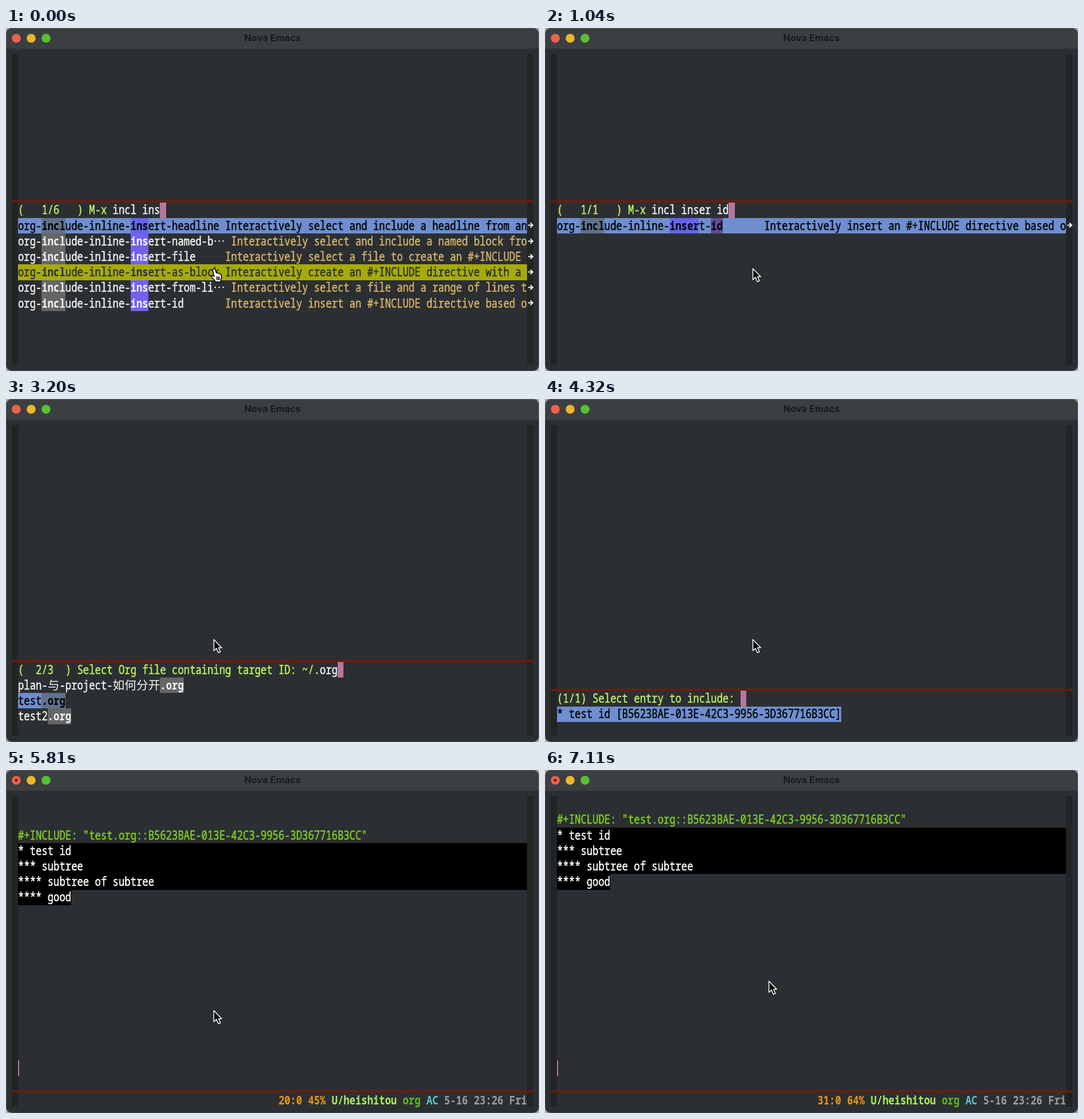
Recreate the animation shown at these times as an HTML page with a canvas. Size 932 by 601 pixels, loop 7230 ms.

```html
<!DOCTYPE html>
<html lang="en">
<head>
<meta charset="utf-8">
<title>Nova Emacs</title>
<style>
  html, body { margin: 0; width: 100%; height: 100%; overflow: hidden; background: #a9a8ab; }
  canvas { display: block; }
</style>
</head>
<body>
<canvas id="stage" width="932" height="601"></canvas>
<script>
const ctx = document.getElementById('stage').getContext('2d');
const LOOP = 7230;
const LEFT = 21, RIGHT = 911, CELL = 10.35, ROW = 27.2, TOP = 46.4;
const BASELINE = 20.7, TALL = 1.25;
const MONO = '"Noto Sans Mono", "DejaVu Sans Mono", monospace';
const CJK = '"Noto Sans CJK SC", "Noto Sans CJK", sans-serif';
const WIDE = /[…\u4e00-\u9fff]/;
const BG = '#2b2f32', WHITE = '#f4f4f2', BLUE = '#6e8ed0', CURSOR = '#b8769e';
const ID = 'B5623BAE-013E-42C3-9956-3D367716B3CC';

ctx.font = `100px ${MONO}`;
const SIZE = CELL * 100 / ctx.measureText('0').width;

const style = (fg, bg, bold) => ({ fg, bg, bold });
const normal = {
  text: style(WHITE),
  first: style(WHITE, '#656665', true),
  second: style(WHITE, '#7261f0', true),
  third: style(WHITE, '#6f4a92', true),
  note: style('#d9b36a')
};
const chosen = {
  text: style('#000', BLUE),
  first: style('#000', '#61718c', true),
  second: style('#000', '#6464ee', true),
  third: style('#000', '#604c92', true),
  note: style('#000')
};
const hovered = {
  text: style(BG),
  first: style(BG, null, true),
  second: style(BG, null, true),
  third: style(BG, null, true),
  note: style(BG)
};
const prompt = style('#bdf266');

const COMMANDS = [
  ['headline', 'Interactively select and include a headline from an'],
  ['named-b…', 'Interactively select and include a named block fro'],
  ['file', 'Interactively select a file to create an #+INCLUDE'],
  ['as-block', 'Interactively create an #+INCLUDE directive with a'],
  ['from-li…', 'Interactively select a file and a range of lines t'],
  ['id', 'Interactively insert an #+INCLUDE directive based o']
];

function box(x, y, w, h, color) {
  ctx.fillStyle = color;
  ctx.fillRect(Math.round(x), Math.round(y),
    Math.round(x + w) - Math.round(x), Math.round(y + h) - Math.round(y));
}

const widthOf = text => [...text].reduce((n, ch) => n + (WIDE.test(ch) ? 2 : 1), 0);

// Writes styled parts on the character grid and returns the next free column.
function line(y, parts, col = 0) {
  for (const [text, { fg, bg, bold }] of parts) {
    if (bg) box(LEFT + col * CELL, y, widthOf(text) * CELL, ROW, bg);
    ctx.fillStyle = ctx.strokeStyle = fg;
    for (const ch of text) {
      const wide = WIDE.test(ch);
      ctx.save();
      ctx.translate(LEFT + col * CELL, Math.round(y + BASELINE));
      if (wide) {
        ctx.font = `${2 * CELL}px ${CJK}`;
      } else {
        ctx.font = `${bold ? 700 : 500} ${SIZE}px ${MONO}`;
        ctx.scale(1, TALL);
      }
      ctx.fillText(ch, 0, 0);
      if (!wide && !bold) {
        ctx.lineWidth = 0.45;
        ctx.strokeText(ch, 0, 0);
      }
      ctx.restore();
      col += wide ? 2 : 1;
    }
  }
  return col;
}

// Separator resting on the row that starts at y.
function divider(y) {
  ctx.fillStyle = '#6e1c0e';
  ctx.fillRect(10, y - 3.6, 912, 3.6);
}

function cutArrow(y) {
  const mid = Math.round(y + ROW / 2) - 0.5;
  ctx.strokeStyle = WHITE;
  ctx.lineWidth = 2;
  ctx.stroke(new Path2D(`M913 ${mid}h7M917 ${mid - 4}l4 4l-4 4`));
}

function blockCursor(col, y, on) {
  if (on) box(LEFT + col * CELL, y, CELL, ROW, CURSOR);
}

function commandRow(y, [name, note], length, look, last) {
  const full = 'org-include-inline-insert-' + name;
  const end = 19 + length;
  const tail = last
    ? [[full.slice(end, -2), look.text], [full.slice(-2), look.third]]
    : [[full.slice(end), look.text]];
  if (look === chosen) box(LEFT, y, RIGHT - LEFT, ROW, BLUE);
  if (look === hovered) box(LEFT, y, RIGHT - LEFT, ROW, '#a6aa0b');
  const col = line(y, [
    [full.slice(0, 4), look.text], [full.slice(4, 8), look.first],
    [full.slice(8, 19), look.text], [full.slice(19, end), look.second], ...tail
  ]);
  line(y, [[note, look.note]], Math.max(35, col + 1));
  cutArrow(y);
}

function commands(typed, cursorOn) {
  const y = 305.6;
  const [word, extra] = typed.split(' ');
  const single = extra === 'id';
  const list = single ? COMMANDS.slice(-1) : COMMANDS;
  divider(y);
  const col = line(y, [[`(   1/${list.length}   ) M-x `, prompt], ['incl ' + typed, normal.text]]);
  blockCursor(col, y, cursorOn);
  list.forEach((command, i) => {
    const look = i === 0 ? chosen : i === 3 ? hovered : normal;
    commandRow(y + (i + 1) * ROW, command, word.length, look, single);
  });
}

function files(selected, message, cursorOn) {
  const y = 460.8;
  divider(y);
  const col = line(y, [
    [`(  ${selected + 1}/3  ) Select Org file containing target ID: ~/`, prompt],
    ['.org', normal.text]
  ]);
  blockCursor(col, y, cursorOn);
  ['plan-与-project-如何分开', 'test', 'test2'].forEach((name, i) => {
    const look = i === selected ? chosen : normal;
    const next = line(y + (i + 1) * ROW, [[name, look.text], ['.org', look.first]]);
    if (message && i === 2) {
      line(y + 3 * ROW, [['[Refresh complete. Processed 4 includes.]', normal.text]], next + 1);
    }
  });
}

function entries(message, cursorOn) {
  const y = 511.4;
  divider(y);
  blockCursor(line(y, [['(1/1) Select entry to include: ', prompt]]), y, cursorOn);
  const col = line(y + ROW, [[`* test id [${ID}]`, chosen.text]]);
  if (message) {
    line(y + ROW, [['[Refresh complete. Processed 4 includ', normal.text]], col + 1);
    cutArrow(y + ROW);
  }
}

function buffer(firstRow, position, cursorOn) {
  if (firstRow !== null) {
    const y = TOP + firstRow * ROW;
    line(y, [[`#+INCLUDE: "test.org::${ID}"`, style('#80cf1f')]]);
    box(LEFT, y + ROW, RIGHT - LEFT, 3 * ROW, '#000');
    ['* test id', '*** subtree', '**** subtree of subtree', '**** good'].forEach((text, i) =>
      line(y + (i + 1) * ROW, [[text, style('#fff', '#000')]]));
  }
  if (cursorOn) box(LEFT, 509, 2, 27, CURSOR);
  const modeLine = 564.8;
  divider(modeLine);
  line(modeLine, [
    [position + ' ', style('#e8950f', null, true)],
    ['U/heishitou ', style('#a9ef52', null, true)],
    ['org ', style('#5cbb14', null, true)],
    ['AC ', style('#62c3d0', null, true)],
    ['5-16 23:26 Fri', style('#9b9c9c', null, true)]
  ], 44);
}

const SCENES = [
  [0, on => commands('ins', on)],
  [120, on => commands('inse', on)],
  [240, on => commands('inser', on)],
  [670, on => commands('inser ', on)],
  [980, on => commands('inser i', on)],
  [1040, on => commands('inser id', on)],
  [1720, on => files(0, false, on)],
  [1840, on => files(0, true, on)],
  [3200, on => files(1, false, on)],
  [4320, on => entries(false, on)],
  [4440, on => entries(true, on)],
  [5750, on => buffer(null, '20:0 45%', on)],
  [5810, on => buffer(2, '20:0 45%', on)],
  [5870, on => buffer(1, '20:0 45%', on)],
  [6490, on => buffer(1, '31:0 64%', on)]
];
const CURSOR_OFF = [[1540, 1720], [2400, 2830], [3700, 4200], [4940, 5440], [6370, 6800]];

function disc(x, y, r, color) {
  ctx.fillStyle = color;
  ctx.beginPath();
  ctx.arc(x, y, r, 0, 7);
  ctx.fill();
}

function chrome(edited) {
  box(0, 0, 932, 601, BG);
  box(0, 0, 932, 36, '#3c3f41');
  box(0, 36, 932, 1, '#303336');
  for (const x of [10, RIGHT]) box(x, 46, 11, 544, '#222426');
  ['#ea624d', '#eeb62a', '#56c135'].forEach((color, i) => disc(18 + 26 * i, 18, 7.8, color));
  if (edited) disc(18, 18, 2.4, '#5e120b');
  ctx.fillStyle = '#191a1b';
  ctx.font = '700 16.5px Inter, sans-serif';
  ctx.textAlign = 'center';
  ctx.fillText('Nova Emacs', 466, 23);
  ctx.textAlign = 'left';
}

const ARROW = new Path2D('M0 0V19.5L4.5 15.4L7.8 23L11.4 21.5L8.2 14.2H13.6Z');
const HAND = new Path2D('M4 2Q6.5 0 8 3L10 9Q12 7.5 13 9.5Q15 8.5 16 10.5' +
  'Q18 10 18.5 13Q19.5 18 17.5 21V24.5H8.5Q7 21 3 17.5Q0 14.5 1.5 13.5Q3.5 13 6 15L3.5 5Q3 3 4 2Z');

function pointer(shape, x, y, fill, edge) {
  ctx.save();
  ctx.translate(x, y);
  ctx.lineJoin = 'round';
  ctx.lineWidth = 1.5;
  ctx.fillStyle = fill;
  ctx.strokeStyle = edge;
  ctx.fill(shape);
  ctx.stroke(shape);
  if (shape === HAND) ctx.stroke(new Path2D('M10 15l1 6M12.5 15l.7 6M15 15l.3 6'));
  ctx.restore();
}

function draw(t) {
  ctx.clearRect(0, 0, 932, 601);
  ctx.save();
  ctx.beginPath();
  ctx.roundRect(0, 0, 932, 601, 10);
  ctx.clip();
  chrome(t >= 5810);
  const cursorOn = !CURSOR_OFF.some(([from, to]) => t >= from && t < to);
  SCENES.findLast(([start]) => start <= t)[1](cursorOn);
  if (t < 1040) pointer(HAND, 358, 420.5, '#fff', '#000');
  else if (t < 7110) pointer(ARROW, 363.5, 421.5, '#000', '#fff');
  else pointer(ARROW, 391.5, 370, '#000', '#fff');
  ctx.restore();
  ctx.strokeStyle = 'rgba(255,255,255,.13)';
  ctx.lineWidth = 1;
  ctx.beginPath();
  ctx.roundRect(0.5, 0.5, 931, 600, 10);
  ctx.stroke();
}

const start = performance.now();
function tick() {
  draw((performance.now() - start) % LOOP);
  requestAnimationFrame(tick);
}
tick();
</script>
</body>
</html>
```
